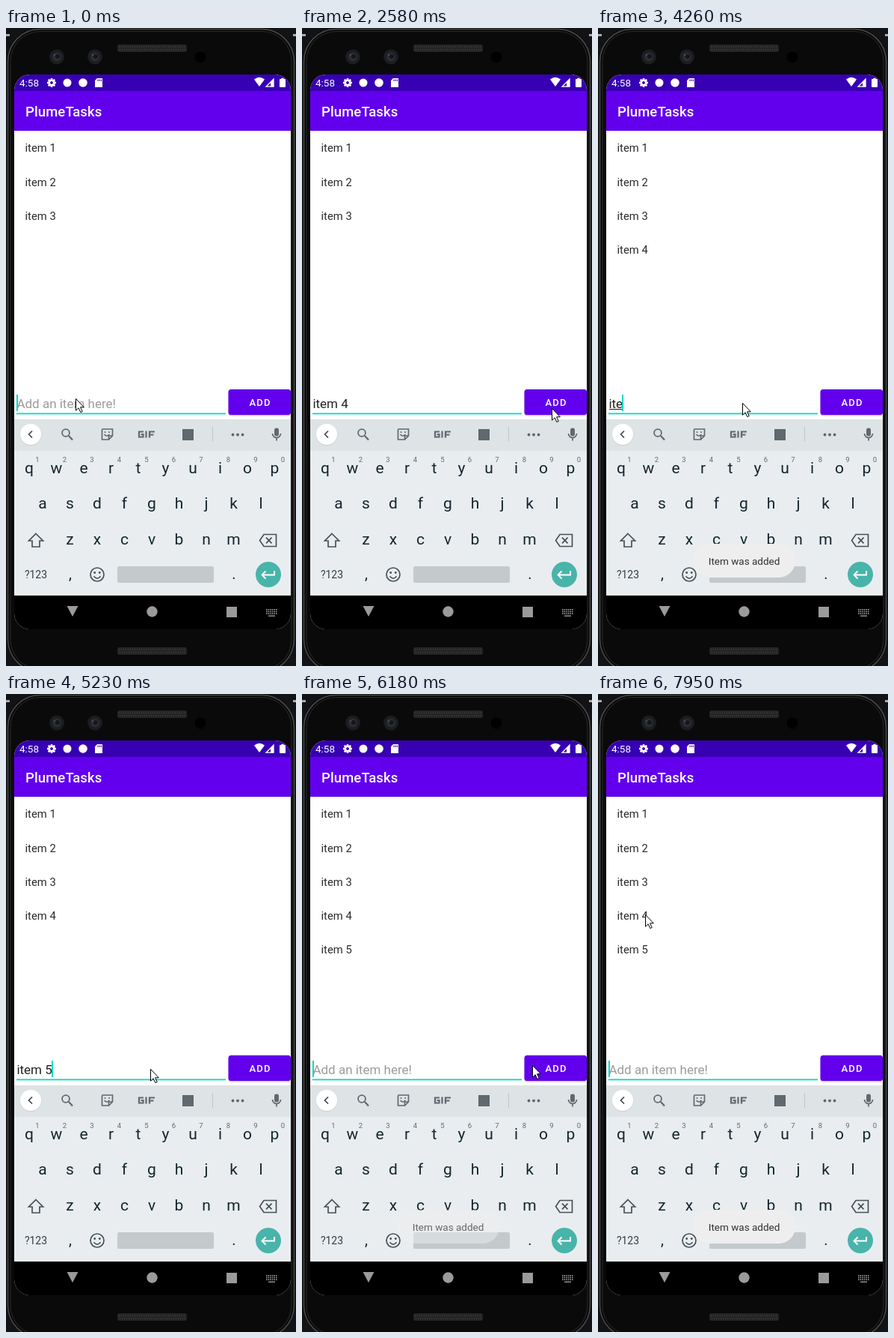
An HTML page with a canvas for the animation above (8000 ms loop, 388x851 px).

```html
<!DOCTYPE html>
<html lang="en">
<head>
<meta charset="utf-8">
<title>Task list demo</title>
<style>
html, body { margin: 0; width: 100%; height: 100%; overflow: hidden; background: #050505; }
canvas { display: block; width: 388px; height: 851px; }
</style>
</head>
<body>
<canvas id="stage"></canvas>
<script>
const W = 388, H = 851, LOOP = 8000;
const canvas = document.getElementById('stage');
const dpr = window.devicePixelRatio || 1;
canvas.width = W * dpr;
canvas.height = H * dpr;
const c = canvas.getContext('2d');
const FONT = 'Roboto, "Noto Sans", sans-serif';
const TEAL = '#03dac5', PURPLE = '#6200ee', ICON = '#5f696e', INK = '#14262d';

// Screen refreshes: start, end, number of steps
const BURSTS = [[0, 0, 1], [120, 330, 3], [800, 1160, 4], [1650, 1750, 2], [1990, 2700, 7],
  [2820, 3550, 7], [3790, 3790, 1], [4140, 4500, 4], [4860, 5590, 7], [5710, 6420, 7],
  [6770, 7500, 7], [7600, 7950, 4]];
const EDITS = [[-170, ''], [800, 'i'], [920, 'ite'], [1040, 'item'], [1160, 'item '],
  [1650, 'item 4'], [2820, ''], [4140, 'i'], [4260, 'ite'], [4380, 'item'], [4500, 'item '],
  [4860, 'item 5'], [5946, '']];
const POINTER = [[0, 93, 494], [1990, 93, 494], [2110, 145, 472], [2226, 225, 454],
  [2345, 300, 474], [2463, 334, 507], [2940, 334, 507], [3063, 285, 503], [3185, 215, 499],
  [3300, 193, 500], [5340, 193, 500], [5468, 245, 477], [5590, 308, 495],
  [6183, 308, 495], [6420, 212, 484], [6650, 212, 484], [7013, 160, 420],
  [7500, 74, 302], [7600, 70, 299], [7950, 63, 294]];

const lastAt = (list, t) => list.filter(e => e[0] <= t).pop();
const clamp = v => Math.max(0, Math.min(1, v));

function snap(t) {
  const [start, end, n] = lastAt(BURSTS, t);
  if (n < 2) return start;
  const d = (end - start) / (n - 1);
  return Math.min(end, start + Math.floor((t - start + 8) / d) * d);
}

function pointerAt(t) {
  const i = POINTER.findIndex(p => p[0] > t);
  if (i < 0) return POINTER[POINTER.length - 1].slice(1);
  const a = POINTER[i - 1], b = POINTER[i], k = (t - a[0]) / (b[0] - a[0]);
  return [1, 2].map(j => Math.round(a[j] + (b[j] - a[j]) * k));
}

function rect(x, y, w, h, color) {
  c.fillStyle = color;
  c.fillRect(x, y, w, h);
}
function round(x, y, w, h, r, color) {
  c.beginPath();
  c.roundRect(x, y, w, h, r);
  c.fillStyle = color;
  c.fill();
}
function ring(x, y, w, h, r, color, lw) {
  c.beginPath();
  c.roundRect(x, y, w, h, r);
  c.strokeStyle = color;
  c.lineWidth = lw;
  c.stroke();
}
const dot = (x, y, r, color) => round(x - r, y - r, 2 * r, 2 * r, r, color);
const circle = (x, y, r, color, lw) => ring(x - r, y - r, 2 * r, 2 * r, r, color, lw);

function draw(d, x, y, color, lw) {
  c.save();
  c.translate(x, y);
  const p = new Path2D(d);
  if (lw) {
    c.strokeStyle = color;
    c.lineWidth = lw;
    c.stroke(p);
  } else {
    c.fillStyle = color;
    c.fill(p);
  }
  c.restore();
}
function text(s, x, y, size, color, align = 'left', weight = 400, gap = 0) {
  c.font = `${weight} ${size}px ${FONT}`;
  c.letterSpacing = gap + 'px';
  c.textAlign = align;
  c.fillStyle = color;
  c.fillText(s, x, y);
  c.letterSpacing = '0px';
}

function speaker(y) {
  round(149, y, 93, 10, 3, '#252525');
  for (let x = 151; x < 240; x += 3) {
    rect(x, y + 2, 1, 2, '#3b3b3b');
    rect(x + 1, y + 6, 1, 2, '#3b3b3b');
  }
}

function phone() {
  rect(0, 0, W, H, '#121316');
  rect(0, 8, 5, 3, '#a9a9ad');
  rect(384, 8, 4, 3, '#b9a5ad');
  round(1, 0, 386, 860, 44, '#0a0a0a');
  ring(2.5, 1.5, 383, 857, 43, '#4a4a4a', 1.6);
  ring(6, 4.5, 376, 851, 40, '#2b2b2b', 1);
  speaker(22);
  speaker(826);
  for (const x of [68, 119]) {
    dot(x, 38.5, 10, '#1c1d20');
    dot(x, 38.5, 6, '#2a2d33');
    dot(x + 1, 38, 3, '#15171b');
    dot(x - 3, 36, 1.3, '#454a52');
  }
  dot(260, 39, 7.5, '#000');
}

function gear(x, y) {
  for (let i = 0; i < 8; i++) {
    c.save();
    c.translate(x, y);
    c.rotate(i * Math.PI / 4);
    rect(-1.3, -6, 2.6, 4, '#fff');
    c.restore();
  }
  circle(x, y, 3.3, '#fff', 2.6);
}

function bars() {
  rect(11, 62, 370, 22, '#3700b3');
  text('4:58', 18, 78, 13.5, '#fff');
  gear(61, 73);
  dot(82, 73, 5.5, '#fff');
  dot(103, 73, 5.8, '#fff');
  draw('M-2 -6H5V6H-5V-3Z', 124, 73, '#fff');
  for (const x of [-1.5, .7, 2.9]) rect(124 + x, 68.5, 1.1, 2.4, '#3700b3');
  draw('M-7 -4Q0 -9.5 7 -4L0 5.5Z', 339, 72.5, '#fff');
  draw('M-5 5.2L5 -5V5.2Z', 353, 73, '#fff', 1.3);
  draw('M1 5.2V-1L5 -5V5.2Z', 353, 73, '#fff');
  round(366, 68, 8, 11, 1, '#fff');
  rect(368.3, 66.8, 3.4, 2, '#fff');
  rect(11, 84, 370, 53, PURPLE);
  rect(11, 137, 370, 1, '#dcdce0');
  text('PlumeTasks', 26, 118, 18.5, '#fff', 'left', 500, .1);
}

function navBar() {
  rect(11, 757, 370, 45, '#000');
  draw('M-7.5 -7H7.5L0 7Z', 89, 778, '#9b9b9b');
  dot(195.5, 778.5, 7.2, '#9b9b9b');
  rect(295, 772, 14, 14, '#9b9b9b');
  for (let r = 0; r < 3; r++)
    for (let i = 0; i < 6; i++) rect(348 + i * 2.6, 775 + r * 2.7, 1.6, 1.6, '#9b9b9b');
  rect(351, 783.5, 9, 1.4, '#9b9b9b');
}

function keyRow(keys, x, y) {
  [...keys].forEach((k, i) => text(k, x + i * 36.5, y, 21, INK, 'center'));
}

function keyboard(suggest) {
  rect(11, 522, 370, 42, '#dee3e6');
  rect(11, 564, 370, 193, '#e9edf0');
  dot(33, 543, 14.3, '#cdd2d5');
  dot(33, 542, 14, '#fff');
  draw(suggest ? 'M-2 -4.5L2.5 0L-2 4.5' : 'M2 -4.5L-2.5 0L2 4.5', 33, 542, '#3c474c', 1.7);
  if (suggest) {
    ['item', 'items', 'itemized'].forEach((s, i) =>
      text(s, 93 + i * 101.3, 549, 17, '#646d72', 'center'));
    rect(141, 531, 1, 23, '#bfc5c8');
    rect(248, 531, 1, 23, '#bfc5c8');
  } else {
    circle(80, 540, 4.9, ICON, 1.8);
    draw('M3 3L8 8.5', 81, 541, ICON, 2.2);
    draw('M-6 -7H7V2L2 7H-7V-6ZM7 2H2V7', 135.5, 542, ICON, 1.7);
    draw('M-3.5 0Q-.5 4 3.5 0', 135, 542, ICON, 1.4);
    dot(132.5, 539, 1, ICON);
    dot(138, 539, 1, ICON);
    // Block letters G, I, F
    draw('M-4 -3.5H-10V3.5H-4.5V0H-7.5M-.5 -4.5V4.5M4 4.5V-3.5H11M4 .5H9.5', 188, 542, ICON, 2.2);
    rect(236, 535, 15, 15, ICON);
    rect(276, 532, 1, 20, '#bfc5c8');
    for (const x of [303.5, 310, 316.5]) dot(x, 542.5, 1.9, ICON);
  }
  round(359, 533.5, 6, 11, 3, ICON);
  draw('M-5.5 -1A5.5 5.5 0 0 0 5.5 -1M0 5V8.5', 362, 542, ICON, 1.7);

  keyRow('qwertyuiop', 31, 594);
  [...'1234567890'].forEach((n, i) => text(n, 42 + i * 36.5, 579, 9.5, ICON, 'center'));
  keyRow('asdfghjkl', 49, 641);
  keyRow('zxcvbnm', 85.5, 689);
  draw('M0 -9L9.5 .5H5V8.5H-5V.5H-9.5Z', 40, 683.5, '#465157', 1.7);
  draw('M-5.5 -8H11V8H-5.5L-11 0ZM-2.5 -3.8L5 3.8M5 -3.8L-2.5 3.8', 350.5, 683.5, '#465157', 1.7);
  text('?123', 40, 734, 14, '#303d43', 'center');
  text(',', 86, 735, 20, INK, 'center');
  text('.', 305, 735, 20, INK, 'center');
  circle(122, 729, 9, '#465157', 1.7);
  dot(118.7, 726.5, 1.4, '#465157');
  dot(125.3, 726.5, 1.4, '#465157');
  draw('M-4.6 1.8Q0 7.4 4.6 1.8', 122, 729.5, '#465157', 1.6);
  round(149, 718, 129, 22, 2, '#c4c9cc');
  dot(351, 729, 17, '#48b4aa');
  draw('M8 -5V.5H-8M-3.5 -4.5L-8.5 .5L-3.5 5.5', 351, 729, '#fff', 2);
}

function field(t) {
  const [since, value] = lastAt(EDITS, t);
  text(value || 'Add an item here!', 14.4, 507, 17, value ? '#202020' : '#9b9b9b');
  const w = value ? c.measureText(value).width : 0;
  if (value && !value.includes(' ')) rect(15, 508, w - 1, 1.2, '#303030');
  rect(14, 513.5, 280, 1.8, TEAL);
  if (Math.floor((t - since) / 480) % 2 === 0) rect(Math.round(14 + Math.max(0, w - .5)), 489, 2, 22, TEAL);
  round(297.5, 483, 83.5, 34.5, 4, '#c9c5d0');
  round(297.5, 482, 83.5, 34, 3.5, PURPLE);
  text('ADD', 340, 504, 13, '#fff', 'center', 500, 1.2);
}

function toast(alpha) {
  if (alpha <= 0) return;
  c.save();
  c.globalAlpha = alpha;
  round(127.5, 688, 136.5, 45, 22, '#eeeeef');
  c.globalAlpha = Math.sqrt(alpha);
  text('Item was added', 195.5, 716, 13.5, '#303030', 'center');
  c.restore();
}

function pointer([x, y]) {
  const shape = 'M.5 .5V16.2L4.1 12.8L6.8 18.6L9.2 17.5L6.6 11.8H11.3Z';
  draw(shape, x, y, '#fff');
  draw(shape, x, y, '#000', 1);
}

function render(now) {
  const t = snap(now % LOOP);
  c.setTransform(dpr, 0, 0, dpr, 0, 0);
  phone();
  c.save();
  c.beginPath();
  c.roundRect(11, 62, 370, 740, 21);
  c.clip();
  rect(11, 62, 370, 740, '#fff');
  bars();
  const count = 3 + (t >= 2820) + (t >= 5946);
  for (let i = 0; i < count; i++) text('item ' + (i + 1), 25.5, 165.3 + i * 45.25, 14.8, '#2a2a2a');
  field(t);
  keyboard((t >= 1040 && t < 1750) || (t >= 4380 && t < 4980));
  navBar();
  toast(t < 5700 ? clamp((t - 2940) / 245) * clamp((5200 - t) / 340) : clamp((t - 6065) / 235));
  c.restore();
  pointer(pointerAt(t));
}

function tick() {
  render(performance.now());
  requestAnimationFrame(tick);
}
tick();
</script>
</body>
</html>
```
